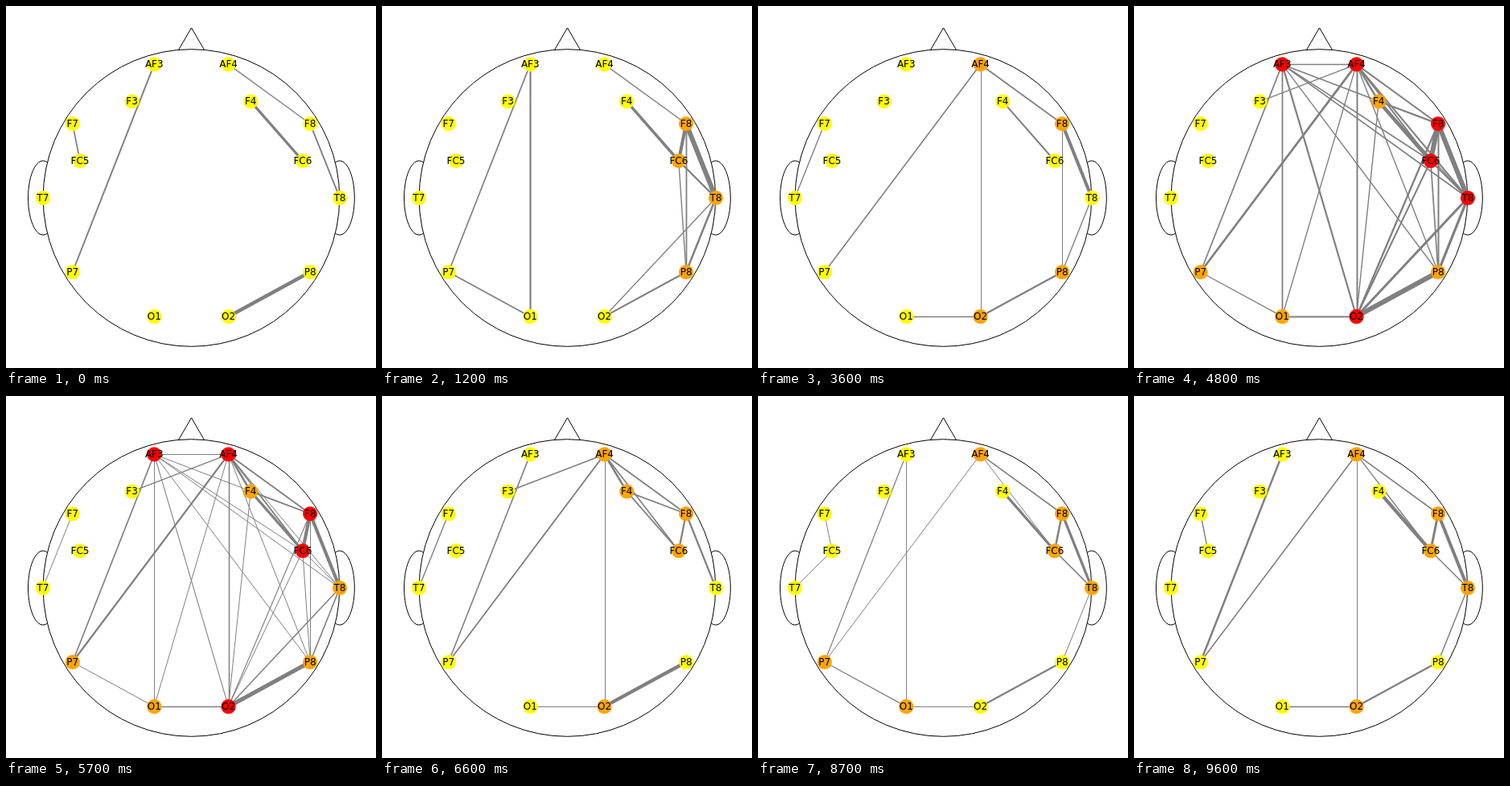
Recreate the animation shown at these times as an HTML page. Size 460 by 449 pixels, loop 9900 ms.

```html
<!DOCTYPE html>
<html lang="en">
<head>
<meta charset="utf-8">
<title>Electrode connectivity</title>
<style>
  html, body { margin: 0; width: 100%; height: 100%; overflow: hidden; background: #fff; }
  svg { display: block; width: 460px; height: 449px; }
  .head { fill: none; stroke: #000; stroke-width: 1; }
  #edges { stroke: #808080; }
  text { font: 12px "DejaVu Sans", sans-serif; text-anchor: middle; }
</style>
</head>
<body>
<svg viewBox="0 0 460 449">
  <g class="head">
    <circle cx="230.4" cy="238" r="184.3"/>
    <path d="M214.5 54.5L230.5 27L246.5 54.5"/>
    <path d="M51.4 194A18.5 46 0 1 0 51.4 282M409.4 194A18.5 46 0 1 1 409.4 282"/>
  </g>
  <g id="edges"></g>
  <g id="nodes"></g>
</svg>
<script>
const STEP = 300, STEPS = 33;
const CX = 230.4, CY = 238, RX = 184.6, RY = 184;

// Left electrode, right electrode, then position on the unit head
const PAIRS = [
  ["AF3", "AF4", .25, .9], ["F3", "F4", .4, .65], ["F7", "F8", .8, .5],
  ["FC5", "FC6", .75, .25], ["T7", "T8", 1, 0], ["P7", "P8", .8, -.5],
  ["O1", "O2", .25, -.8]
];

// Known network states: step index and edges with line widths
const KEYS = [
  [0, "AF3-P7 2,AF4-F8 1.3,F4-FC6 3.3,F8-T8 2,F7-FC5 1.7,P8-O2 4.5"],
  [4, "F8-T8 6,F8-FC6 4,F4-FC6 3.5,FC6-T8 2.4,FC6-P8 1.4,F8-P8 1.8,T8-P8 2.5," +
      "T8-O2 1.3,P8-O2 2.1,AF4-F8 1.4,AF3-P7 1.7,AF3-O1 2.2,P7-O1 1.8"],
  [12, "AF4-P7 1.6,AF4-O2 1,AF4-F8 1.8,F8-T8 4,F8-P8 1,T8-P8 1.4,P8-O2 2.3," +
       "O1-O2 1.3,F4-FC6 2,F7-T7 1.4"],
  [16, "AF3-AF4 1.6,F3-AF4 1.4,AF3-P7 1.7,AF4-P7 2.7,AF3-O1 1.8,AF3-O2 2.2," +
       "AF4-O2 2,AF4-O1 1.4,F4-O2 1.4,AF3-F8 1.6,AF3-FC6 1.6,AF3-T8 1.6," +
       "AF3-P8 1.4,AF4-P8 1.4,AF4-F4 2.5,AF4-F8 2,AF4-T8 2,AF4-FC6 2,F4-F8 2," +
       "F4-FC6 4.5,F4-T8 1.2,F8-FC6 6,F8-T8 6,FC6-T8 2,F8-P8 2,FC6-P8 1.7," +
       "T8-P8 3.3,P8-O2 6,T8-O2 3,F8-O2 2.3,FC6-O2 2,P7-O1 1.4,O1-O2 1.8"],
  [22, "AF3-P7 1.6,F3-AF4 1.6,AF4-P7 1.8,AF4-O2 1,AF4-F4 2.6,AF4-FC6 1.7," +
       "AF4-F8 1.8,F4-F8 1.7,F4-FC6 1.8,F8-FC6 2.2,F8-T8 2.2,F7-T7 1.4," +
       "O1-O2 1.2,P8-O2 4.3"],
  [26, "AF3-O1 1.4,FC5-T7 1.5,P7-O1 2.7,O1-O2 1,P8-O2 2.2,AF4-F8 1.5," +
       "F4-FC6 2.2,F8-FC6 2,F8-T8 2.7,FC6-T8 2"],
  [32, "AF3-P7 2.5,AF4-P7 1.6,AF4-O2 1,AF4-F8 1.6,AF4-FC6 1.4,F8-FC6 3," +
       "F8-T8 4,F4-FC6 4.3,FC6-T8 1.5,T8-P8 1.5,P8-O2 2.3,O1-O2 1.4,F7-FC5 1.4"]
].map(([at, list]) => ({
  at,
  widths: Object.fromEntries(list.split(",").map(item => {
    const [id, width] = item.split(" ");
    return [id, +width];
  }))
}));

function add(parent, tag, attrs) {
  const el = document.createElementNS("http://www.w3.org/2000/svg", tag);
  for (const key in attrs) el.setAttribute(key, attrs[key]);
  return document.getElementById(parent).appendChild(el);
}

const nodes = {}, edges = {};

function addNode(name, ux, uy) {
  const x = CX + ux * RX, y = CY - uy * RY;
  const dot = add("nodes", "circle", { cx: x, cy: y, r: 9.1 });
  add("nodes", "text", { x, y: Math.round(y + 4) }).textContent = name;
  nodes[name] = { x, y, dot };
}

// Upright and level lines sit on pixel centres to stay crisp
const snap = v => Math.round(v) + .5;

function addEdge(id) {
  const [a, b] = id.split("-");
  let { x: x1, y: y1 } = nodes[a], { x: x2, y: y2 } = nodes[b];
  if (x1 === x2) x1 = x2 = snap(x1);
  if (y1 === y2) y1 = y2 = snap(y1);
  edges[id] = { a, b, line: add("edges", "line", { x1, y1, x2, y2 }) };
}

for (const [left, right, x, y] of PAIRS) {
  addNode(left, -x, y);
  addNode(right, x, y);
}

for (const { widths } of KEYS) {
  for (const id in widths) if (!edges[id]) addEdge(id);
}

const colorFor = degree => degree > 6 ? "#f00" : degree > 2 ? "#ffa500" : "#ff0";

function draw(step) {
  const next = Math.max(1, KEYS.findIndex(key => key.at >= step));
  const from = KEYS[next - 1], to = KEYS[next];
  const mix = (step - from.at) / (to.at - from.at);
  const degree = {};
  for (const id in edges) {
    const { a, b, line } = edges[id];
    const width = (from.widths[id] || 0) * (1 - mix) + (to.widths[id] || 0) * mix;
    const shown = width >= .7;
    line.setAttribute("stroke-width", shown ? Math.max(1, width) : 0);
    if (shown) for (const name of [a, b]) degree[name] = (degree[name] || 0) + 1;
  }
  for (const name in nodes) nodes[name].dot.setAttribute("fill", colorFor(degree[name] || 0));
}

const start = performance.now();
let last = 0;

function tick() {
  const step = Math.floor((performance.now() - start) / STEP) % STEPS;
  if (step !== last) draw(last = step);
  requestAnimationFrame(tick);
}

draw(0);
requestAnimationFrame(tick);
</script>
</body>
</html>
```
